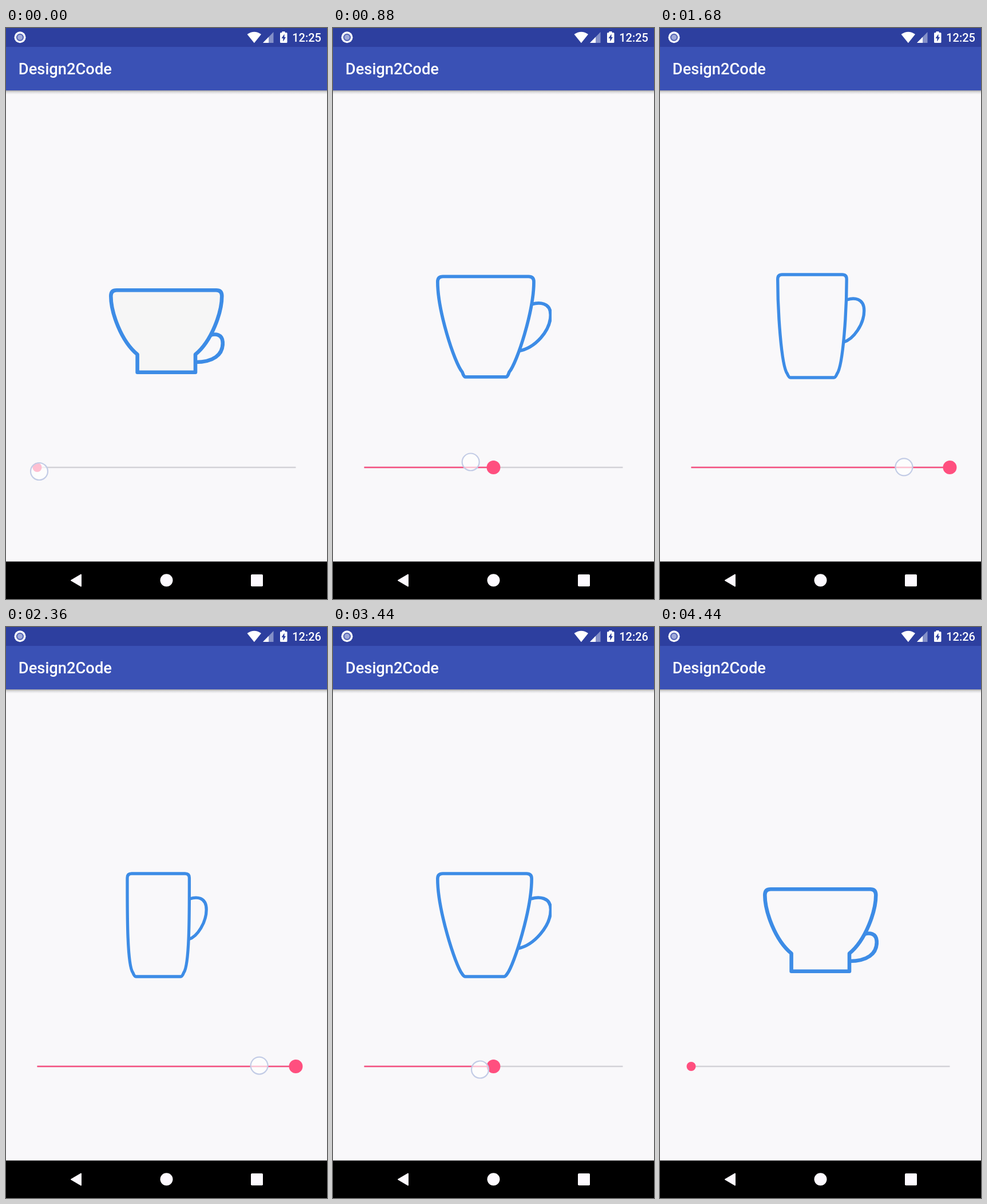
An HTML page that plays this animation: 561 px wide and 998 px high, repeating every 8800 ms.

```html
<!DOCTYPE html>
<html lang="en">
<head>
<meta charset="utf-8">
<title>Cup slider</title>
<style>
  html, body { margin: 0; width: 100%; height: 100%; overflow: hidden; background: #f9f8fa; }
  svg { display: block; width: 100%; height: 100%; }
  text { font-family: Roboto, sans-serif; font-weight: 500; fill: #fff; }
</style>
</head>
<body>
<svg viewBox="0 0 561 998">
  <defs>
    <linearGradient id="shade" x2="0" y2="1">
      <stop stop-color="#000" stop-opacity=".34"/>
      <stop offset=".4" stop-color="#000" stop-opacity=".12"/>
      <stop offset="1" stop-color="#000" stop-opacity="0"/>
    </linearGradient>
    <clipPath id="iconBox"><rect x="179.5" y="400" width="202.5" height="240"/></clipPath>
  </defs>

  <rect width="561" height="998" fill="#f9f8fa"/>
  <rect y="109" width="561" height="7" fill="url(#shade)"/>
  <rect y="32" width="561" height="77" fill="#3a51b5"/>
  <rect width="561" height="33" fill="#2d3f9f"/>
  <text x="21.8" y="81" font-size="27.3">Design2Code</text>

  <g fill="#fff">
    <circle cx="24.5" cy="16.3" r="10"/>
    <circle cx="24.5" cy="16.3" r="6.6" fill="#5666b6"/>
    <circle cx="24.5" cy="16.3" r="4.5" fill="#a0aad9"/>
    <path d="M421.5 11Q434 2.5 446 11L433.8 26.2Z"/>
    <path d="M449 26H467.5V7Z" fill="#8490c8"/>
    <path d="M449 26H459V15.7Z"/>
    <rect x="482.5" y="6" width="5" height="4"/>
    <rect x="479" y="8" width="12.5" height="18" rx="1.5"/>
    <path d="M486.5 10.5L481.5 18H484.3V23.7L489 16H486.5Z" fill="#2d3f9f"/>
  </g>
  <text id="clock" x="551" y="24" font-size="20" text-anchor="end">12:25</text>

  <g fill="none" stroke="#3d8ce6" stroke-linejoin="round" clip-path="url(#iconBox)">
    <path id="handle"/>
    <path id="bowl"/>
  </g>

  <g stroke-width="2.7">
    <path d="M54.5 768H506.5" stroke="#d2d1d6"/>
    <path id="progress" stroke="#f5507f"/>
  </g>
  <circle id="thumb" cy="768" fill="#ff4f7f"/>
  <circle id="finger" r="15" fill="#fff" fill-opacity=".64" stroke="#c3cce6" stroke-width="2.2"/>

  <path d="M0 932.5H561V998H0Z"/>
  <g fill="#fdfaff">
    <path d="M114 965.5L131 955.5V975.5Z" stroke="#fdfaff" stroke-width="2" stroke-linejoin="round"/>
    <circle cx="280.5" cy="965.3" r="11"/>
    <rect x="428" y="955" width="21" height="21" rx="1.8"/>
  </g>
</svg>
<script>
const LOOP = 8800, STEP = 40, MORPH = 260, TOUCH = 280, RELEASE = 4120;

const $ = id => document.getElementById(id);
const set = (id, attrs) => {
  for (const name in attrs) $(id).setAttribute(name, attrs[name]);
};
const ramp = (t, from, to) => Math.min(1, Math.max(0, (t - from) / (to - from)));
const lerp = (a, b, k) => a + (b - a) * k;
const easeIn = k => k * k;
const easeOut = k => Math.sin(k * Math.PI / 2);
const easeInOut = k => (1 - Math.cos(Math.PI * k)) / 2;

// Each cup is symmetric about its axis: rim, side and foot are half widths.
const bowlCup = {
  stroke: 6.6, axis: 280.3, rim: 97, top: 458.3, corner: 10,
  side: 79.4, sideY: 547, heel: 50.7, heelY: 570.5, foot: 50.7, bottom: 601.8,
  gripX: 357, gripY: 537, reach: 378.8, reachY: 551, tailX: 329, tailY: 584, tailPull: 0.5, belly: 0.6
};
const wideMug = {
  stroke: 5.6, axis: 265, rim: 82.2, top: 431, corner: 9,
  side: 51.5, sideY: 590, heel: 39.5, heelY: 606, foot: 33.5, bottom: 611,
  gripX: 346, gripY: 475, reach: 380.5, reachY: 494, tailX: 323, tailY: 562, tailPull: -6, belly: 0.42
};
const slimMug = {
  ...wideMug, stroke: 5.3, axis: 266.2, rim: 54.2, corner: 7.5,
  side: 55, heel: 44.5, heelY: 604, foot: 39,
  gripX: 321.4, reach: 350.2, tailX: 319.3, tailY: 545.8, tailPull: -4.5
};
const CUPS = [bowlCup, wideMug, slimMug];

// Each swipe moves the finger and, at the time "snap", selects the cup "pick".
const SWIPES = [
  { start: TOUCH, end: 1080, from: [58, 775], to: [272, 770], arc: 18, ease: easeInOut, snap: 680, pick: 1 },
  { start: 1200, end: 1920, from: [274, 770], to: [450, 766], arc: 0, ease: easeOut, snap: 1500, pick: 2 },
  { start: 2240, end: 3140, from: [450, 766], to: [279, 770], arc: 0, ease: easeInOut, snap: 2635, pick: 1 },
  { start: 3160, end: 4040, from: [279, 770], to: [62, 781], arc: 0, ease: easeIn, snap: 3760, pick: 0 }
];

function fingerAt(t) {
  const swipe = SWIPES.findLast(s => s.start <= t) || SWIPES[0];
  const { start, end, from, to, arc, ease } = swipe;
  const k = ramp(t, start, end);
  return {
    cx: lerp(from[0], to[0], ease(k)),
    cy: lerp(from[1], to[1], k) - arc * Math.sin(Math.PI * k)
  };
}

function blend(a, b, k) {
  const cup = {};
  for (const key in a) cup[key] = lerp(a[key], b[key], k);
  return cup;
}

function drawCup(c) {
  const left = half => c.axis - half, right = half => c.axis + half;
  const shoulder = c.top + c.corner, bend = shoulder + (c.sideY - shoulder) * 0.36;
  const toe = (c.heel + c.foot) / 2;
  set('bowl', {
    'stroke-width': c.stroke,
    d: `M${left(c.rim)} ${shoulder}Q${left(c.rim)} ${c.top} ${left(c.rim - c.corner)} ${c.top}
      H${right(c.rim - c.corner)}Q${right(c.rim)} ${c.top} ${right(c.rim)} ${shoulder}
      C${right(c.rim)} ${bend} ${right(c.side)} ${c.sideY} ${right(c.heel)} ${c.heelY}
      Q${right(toe)} ${c.bottom} ${right(c.foot)} ${c.bottom}H${left(c.foot)}
      Q${left(toe)} ${c.bottom} ${left(c.heel)} ${c.heelY}
      C${left(c.side)} ${c.sideY} ${left(c.rim)} ${bend} ${left(c.rim)} ${shoulder}Z`
  });
  const lift = c.gripY - (c.reachY - c.gripY) * 0.2;
  set('handle', {
    'stroke-width': c.stroke,
    d: `M${c.gripX} ${c.gripY}
      C${lerp(c.gripX, c.reach, 0.38)} ${lift} ${c.reach} ${lift} ${c.reach} ${c.reachY}
      C${c.reach} ${lerp(c.reachY, c.tailY, c.belly)}
      ${lerp(c.tailX, c.reach, c.belly + 0.08)} ${c.tailY + c.tailPull} ${c.tailX} ${c.tailY}`
  });
}

function draw(time) {
  const t = Math.floor((time % LOOP) / STEP) * STEP;

  const index = SWIPES.findLastIndex(s => s.snap <= t);
  const pick = i => i < 0 ? 0 : SWIPES[i].pick;
  const since = index < 0 ? 0 : SWIPES[index].snap;
  const morph = easeInOut(ramp(t, since, since + MORPH));
  drawCup(blend(CUPS[pick(index - 1)], CUPS[pick(index)], morph));
  set('bowl', { fill: t < TOUCH ? '#f6f6f6' : 'none' });

  const x = 54.5 + 226 * pick(index);
  const press = ramp(t, TOUCH - STEP, 440) - ramp(t, RELEASE - STEP, 4400);
  set('thumb', { cx: x, r: 8 + 4 * press });
  set('progress', { d: `M54.5 768H${x}` });

  set('finger', { ...fingerAt(t), visibility: t < RELEASE ? 'visible' : 'hidden' });
  $('clock').textContent = t < 1800 ? '12:25' : '12:26';
}

const start = performance.now();
function tick() {
  draw(performance.now() - start);
  requestAnimationFrame(tick);
}
tick();
</script>
</body>
</html>
```
